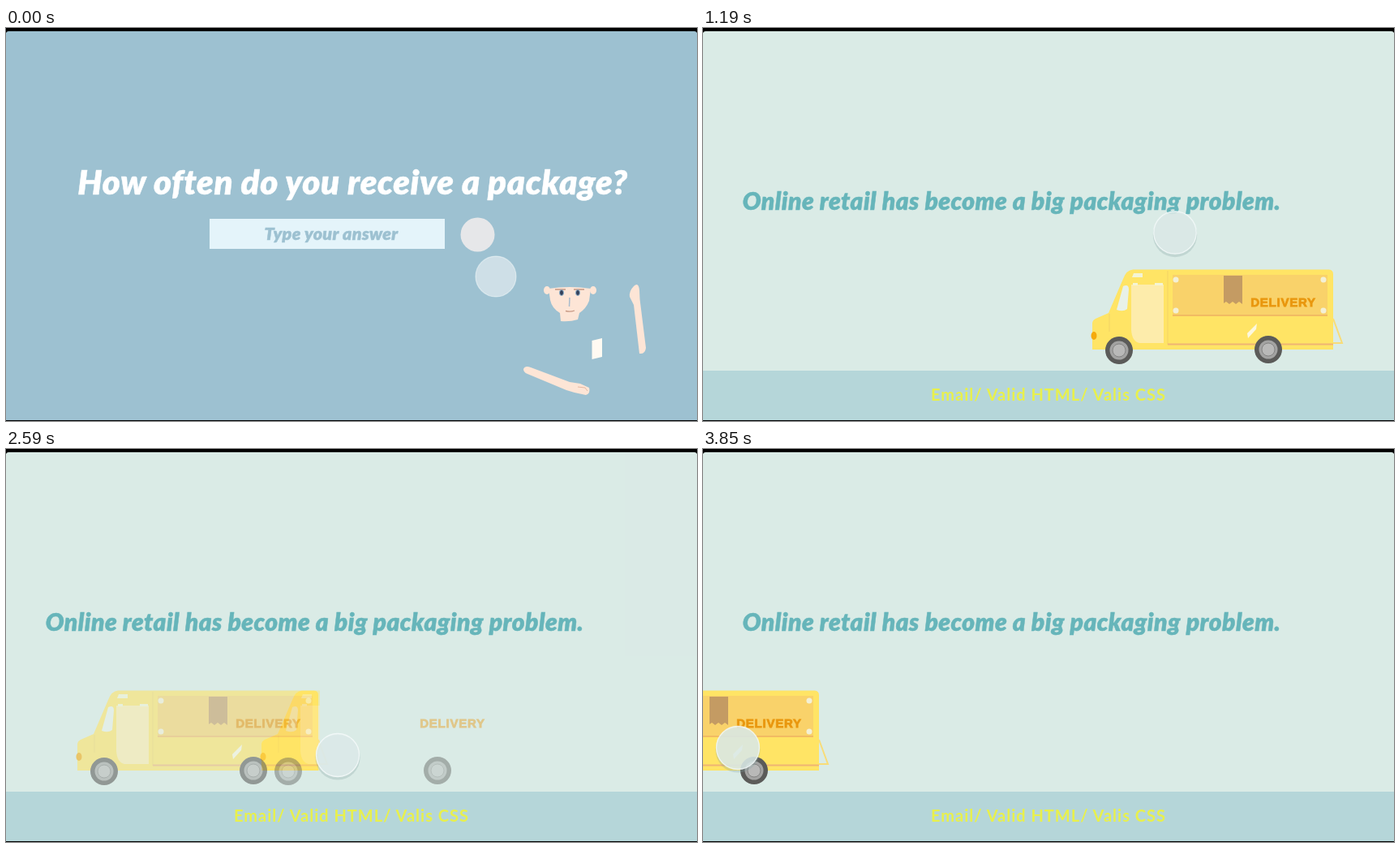
An HTML page that plays this animation: 852 px wide and 484 px high, repeating every 3920 ms.

```html
<!DOCTYPE html>
<html lang="en">
<head>
<meta charset="utf-8">
<title>Package survey</title>
<style>
  html, body { margin: 0; width: 100%; height: 100%; overflow: hidden; background: #9dc1d1; }
  svg { display: block; width: 852px; height: 484px; }
  text { text-anchor: middle; }
  .casual { font: italic 900 30px Lato, sans-serif; letter-spacing: .015em; fill: currentColor; stroke: currentColor; stroke-width: .5px; }
  .footer { font: 700 20px Lato, sans-serif; letter-spacing: 1px; fill: #e8f04c; }
  .delivery { font: 700 15px "Liberation Sans", Arial, sans-serif; letter-spacing: .75px; }
</style>
</head>
<body>
<svg viewBox="0 0 852 484">
  <defs>
    <g id="wheel">
      <circle r="17" fill="#5b5b59"/>
      <circle r="11.5" fill="#a3a3a2"/>
      <circle r="8" fill="#b9b9b8" stroke="#858584"/>
    </g>
    <g id="body">
      <path fill="none" stroke="#f8dc78" stroke-width="2" d="M777 358L788 388H776"/>
      <path fill="#ffe465" d="M530 297.500H772Q777 298 777 303V396H480V364Q480 360 484 358L500 351 518 309Q522 298 530 297.500Z"/>
      <path fill="#fdecab" d="M528 316H568V388H538Q529 386 528 372Z"/>
      <path fill="#e8f1e9" d="M518 318Q525 315 525 322L523 346Q518 350 510 347Z"/>
      <path fill="#f4f4d4" d="M531 302H542V307H529ZM530 314H536V317H530ZM557 314H567V317H557Z"/>
      <path fill="none" stroke="#f3d367" d="M573 299V390M501 352V374"/>
      <path fill="#fcf8df" d="M683 364L682 371 672 382 671 376Z"/>
      <ellipse cx="482" cy="379" rx="3.5" ry="5" fill="#f5aa0c"/>
    </g>
    <g id="panel">
      <rect x="579" y="304" width="191" height="50" fill="#f9d26a"/>
      <path stroke="#efb060" stroke-width="1.6" d="M579 354H770"/>
      <path stroke="#efb575" stroke-width="2" d="M573 389.5H777"/>
      <path fill="#c49b63" d="M642 305H665V340L661 337 657 340 653 337 649 340 645 337 642 339Z"/>
      <g fill="#f3f0d6">
        <circle cx="583" cy="310" r="3.5"/><circle cx="765" cy="310" r="3.5"/>
        <circle cx="583" cy="348" r="3.5"/><circle cx="765" cy="348" r="3.5"/>
      </g>
    </g>
    <g id="parts">
      <text class="delivery" x="715.5" y="342.5" fill="#e9970e" stroke="#e9970e" stroke-width=".8">DELIVERY</text>
      <use href="#wheel" x="513" y="397"/>
      <use href="#wheel" x="697" y="396"/>
    </g>
  </defs>

  <rect width="852" height="484" fill="#9dc1d1"/>
  <text class="casual" x="427.5" y="204.5" color="#fff" style="font-size:42px">How often do you receive a package?</text>
  <rect x="251" y="235" width="290" height="37" fill="#e4f4fa"/>
  <text class="casual" x="401" y="261" color="#9dc1d1" style="font-size:21.5px">Type your answer</text>
  <circle cx="581.5" cy="254.5" r="21" fill="#e6e7e9"/>

  <g class="clothes">
    <path fill="#1e69a8" d="M658 452H740V484H658Z"/>
    <path fill="#f2c672" d="M641 364Q665 356 684 359H706Q750 358 774 364L784 398H665V412H641Z"/>
    <path fill="#c3a083" d="M673 374L783 366V446L741 457 642 447V416L673 412Z"/>
    <path fill="#a58469" d="M673 374H683V451H673ZM741 398H745V456H741Z"/>
  </g>
  <g fill="#fde5d6">
    <path d="M669 321Q695 317 721 321L719 336Q715 346 707 351L705 359Q695 362 684 361L683 351Q673 345 671 335Z"/>
    <ellipse cx="667" cy="323" rx="4" ry="5"/>
    <ellipse cx="724" cy="323" rx="4" ry="5"/>
    <path d="M769 331Q768 324 774 318 780 312 781 323L781.500 334 789 394Q788 402 781 401L774 341Z"/>
    <path d="M638 420Q640 415 647 418L695 436 708 438 719 443Q721 450 715 452L701 449 691 446 643 426Q638 424 638 420Z"/>
    <path d="M722.500 385L735 382V405L722.500 408Z" fill="#fffaf2"/>
  </g>
  <path fill="none" stroke="#e6b9a2" d="M705 442L714 443 717 447"/>
  <path fill="none" stroke="#c89984" stroke-width="1.3" d="M677 322H690M700 322H713M690 348.500Q696 350 701 348"/>
  <path fill="none" stroke="#a9bccd" stroke-width="1.5" d="M695 332L694.5 343"/>
  <g fill="#34405a" stroke="#8fb3cd">
    <ellipse cx="685" cy="326" rx="2.5" ry="3.5"/>
    <ellipse cx="705" cy="326" rx="2.5" ry="3.5"/>
  </g>

  <g id="scenes"></g>
  <g class="clothes" id="cap">
    <path fill="#2e3f92" d="M669 320Q668 296 695 296 720 296 721 320 695 315 669 320Z"/>
  </g>

  <g id="cursor">
    <circle cy="3" r="27.5" fill="#7f9d9d"/>
    <circle id="disc" r="26.5" stroke="#f4fafa" stroke-width="1.3"/>
  </g>
  <path d="M0 0H852V6Q851 4 849 4H3Q1 4 0 6ZM0 483H852V484H0Z"/>
</svg>
<script>
const LOOP = 3920, STEP = 70, FADE = 490;
const $ = id => document.getElementById(id);
const clamp = v => Math.max(0, Math.min(1, v));

// Each stop dissolves in over the previous one.
const stops = [
  { x: 0, start: 630 },
  { x: -165, start: 1470, panelFirst: true },
  { x: -392, start: 2310 },
  { x: -634, start: 2940 }
];

const part = (id, x) => `<use href="#${id}" x="${x}"/>`;

function sceneMarkup({ x, panelFirst }, i) {
  const next = stops[i + 1];
  const edge = next ? 779 + next.x : 852;
  const cover = `<rect class="cover" x="${edge}" y="290" width="${852 - edge}" height="130" fill="#daebe6"/>`;
  const panel = part("panel", x);
  return `<g class="scene">
    <rect width="852" height="484" fill="#daebe6"/>
    <g class="late">
      <rect y="422" width="852" height="62" fill="#b5d6d9"/>
      <text class="casual" x="380.5" y="224" color="#66b5ba">Online retail has become a big packaging problem.</text>
    </g>
    <text class="footer" x="426" y="458.5">Email/ Valid HTML/ Valis CSS</text>
    ${part("body", x)}${panelFirst ? panel + cover : cover + panel}${part("parts", x)}
  </g>`;
}
$("scenes").innerHTML = stops.map(sceneMarkup).join("");
const scenes = [...document.querySelectorAll(".scene")];
const clothes = document.querySelectorAll(".clothes");
const late = document.querySelector(".late");

// time, x, y, radius scale, whiteness
const path = [
  [0, 604, 306, .94, .56],
  [490, 582, 252, .94, .6],
  [840, 582, 252, .94, .9],
  [1330, 582, 252, 1, .86],
  [1960, 413, 389, 1, .9],
  [2310, 409, 377, 1, .9],
  [2730, 409, 377, 1, .9],
  [3220, 343, 368, 1, .9],
  [3800, 43, 368, 1, .84],
  [LOOP, 43, 368, 1, .84]
];

function cursorAt(t) {
  const i = path.findIndex(k => k[0] > t), a = path[i - 1], b = path[i];
  const u = (t - a[0]) / (b[0] - a[0]), e = u * u * (3 - 2 * u);
  return a.map((v, j) => v + (b[j] - v) * e);
}

function draw(now) {
  const t = Math.floor(now % LOOP / STEP) * STEP;
  const progress = stops.map(s => clamp((t - s.start) / FADE));

  clothes.forEach(c => c.style.display = t < stops[0].start ? "none" : "");
  $("cap").style.opacity = 1 - progress[0];
  // The headline and band only join in the second half of the first dissolve.
  late.style.opacity = clamp(2 * progress[0] - 1);
  scenes.forEach((scene, i) => {
    scene.style.opacity = progress[i];
    scene.querySelector(".cover").style.display = progress[i + 1] > .3 ? "" : "none";
  });

  const [, x, y, scale, white] = cursorAt(t);
  $("cursor").setAttribute("transform", `translate(${x} ${y}) scale(${scale})`);
  $("cursor").firstElementChild.style.opacity = .28 * progress[0];
  $("disc").setAttribute("fill", t < 1000 ? "#f4f8fa" : "#deecea");
  $("disc").setAttribute("fill-opacity", white);
  $("disc").setAttribute("stroke-opacity", white);
}

const origin = performance.now();
function tick() {
  draw(performance.now() - origin);
  requestAnimationFrame(tick);
}
tick();
</script>
</body>
</html>
```
